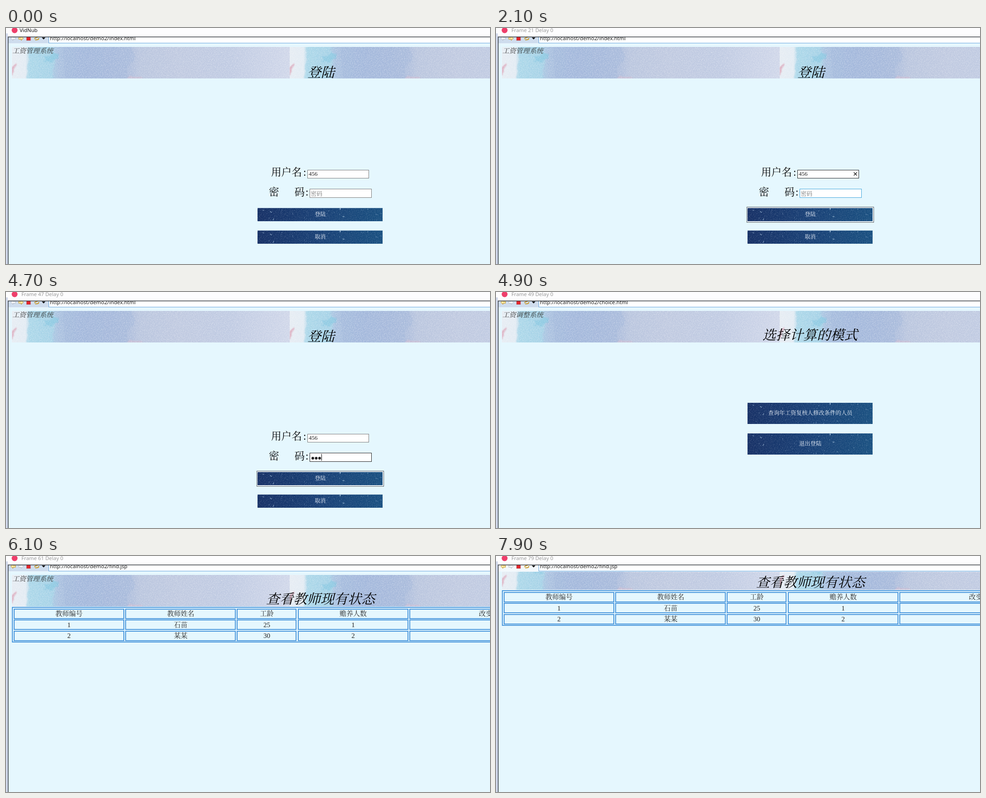
An HTML page that plays this animation: 1068x524 px, repeating every 8 s.

```html
<!DOCTYPE html>
<html lang="zh">
<head>
<meta charset="utf-8">
<style>
  html, body { margin: 0; width: 100%; height: 100%; overflow: hidden; background: #e5f7fe; }
  svg { display: block; }
  text { font-family: "Liberation Serif", "Noto Serif CJK SC", "Noto Sans CJK SC", "Noto Sans CJK", serif; font-size: 15px; fill: #222; white-space: pre; }
  .ui { font-family: "Noto Sans", "Open Sans", sans-serif; }
  .site { font-style: italic; fill: #333; }
  .head { font-style: italic; font-size: 30px; fill: #000; }
  .label { font-size: 22.6px; font-weight: 500; fill: #000; }
  .btn { font-size: 12.4px; fill: #f4f8ff; text-anchor: middle; }
  .field { fill: #fff; stroke: #7a7a7a; }
  .cells { fill: none; stroke: #4a97dc; stroke-width: 2; }
  .cells ~ text { text-anchor: middle; }
</style>
</head>
<body>
<svg width="1068" height="524" viewBox="0 0 1068 524">
  <defs>
    <linearGradient id="wash">
      <stop offset="0" stop-color="#e6ecf3"/><stop offset=".05" stop-color="#e2ebf3"/>
      <stop offset=".065" stop-color="#b4d8ea"/><stop offset=".14" stop-color="#a9cbe4"/>
      <stop offset=".17" stop-color="#a9c0df"/><stop offset=".27" stop-color="#a5b9dc"/>
      <stop offset=".42" stop-color="#adbddc"/><stop offset=".46" stop-color="#b9c5de"/>
      <stop offset=".6" stop-color="#bfc9e0"/><stop offset=".78" stop-color="#bfcae2"/>
      <stop offset="1" stop-color="#cfd6e9"/>
    </linearGradient>
    <linearGradient id="night">
      <stop offset="0" stop-color="#152f65"/><stop offset=".5" stop-color="#173f75"/><stop offset="1" stop-color="#184f80"/>
    </linearGradient>
    <filter id="grain" x="0" y="0" width="1" height="1" color-interpolation-filters="sRGB">
      <feTurbulence type="fractalNoise" baseFrequency=".6" numOctaves="2" seed="3"/>
      <feColorMatrix values="0 0 0 0 1  0 0 0 0 1  0 0 0 0 1  2.2 0 0 0 -.98"/>
    </filter>
    <filter id="rough" x="-.2" y="-.2" width="1.4" height="1.4" color-interpolation-filters="sRGB">
      <feTurbulence type="fractalNoise" baseFrequency=".07" numOctaves="3"/>
      <feDisplacementMap in="SourceGraphic" scale="14" xChannelSelector="R" yChannelSelector="G"/>
      <feGaussianBlur stdDeviation="1"/>
    </filter>
    <symbol id="tile" width="613" height="70">
      <rect width="613" height="70" fill="url(#wash)"/>
      <g filter="url(#rough)">
        <path d="M36 -9H86L98 18L92 46L88 80H34Z" fill="#a5d6e8" opacity=".65"/>
        <path d="M72 22L96 14L106 20L88 34L72 36Z" fill="#7fc5e0" opacity=".6"/>
        <path d="M0 46L8 40L7 56L0 68Z" fill="#dcb3c4"/>
        <path d="M112 -9H258L272 26L250 50L262 80H118Z" fill="#9db5da" opacity=".35"/>
        <path d="M252 68L284 64L296 72L256 76Z" fill="#cdbcd2" opacity=".7"/>
      </g>
      <rect width="613" height="70" filter="url(#grain)" opacity=".5"/>
    </symbol>
    <symbol id="sky">
      <rect width="276" height="47" fill="url(#night)"/>
      <rect width="276" height="47" filter="url(#grain)" opacity=".22"/>
      <g id="stars" stroke="#b9d3ea" stroke-linecap="round"/>
    </symbol>
    <path id="arrow" d="M-5.5 0L-.5 -4.5V-2H5V2H-.5V4.5Z"/>
    <clipPath id="view"><rect x="5" y="35" width="1063" height="489"/></clipPath>
    <clipPath id="bar"><rect x="5" y="20" width="1063" height="15"/></clipPath>
  </defs>

  <rect width="1068" height="524" fill="#e5f7fe"/>
  <g clip-path="url(#view)">
    <g id="page">
      <use href="#tile" x="13" y="42"/>
      <use href="#tile" x="626" y="42"/>
      <text id="site" class="site" x="14" y="56"></text>
      <text id="head" class="head"></text>

      <g id="login">
        <text class="label" x="585" y="328">用户名</text><text class="label" x="656" y="328">:</text>
        <text class="label" x="580" y="372">密</text><text class="label" x="636.5" y="372">码</text><text class="label" x="661" y="372">:</text>
        <rect id="user" class="field" x="665.5" y="315.5" width="135" height="18"/>
        <text x="668" y="328" style="font-size:13px">456</text>
        <path id="clear" d="M789.5 320.5l7 7m0 -7l-7 7" stroke="#222" stroke-width="1.5"/>
        <rect id="pass" class="field" x="670.5" y="357.5" width="136" height="19"/>
        <text id="hint" x="672.5" y="372" style="font-size:12.8px;fill:#767676">密码</text>
        <g id="dots" fill="#222"><circle cx="677" cy="369" r="3"/><circle cx="684.5" cy="369" r="3"/><circle cx="692" cy="369" r="3"/></g>
        <rect id="caret" width="1" height="15" fill="#000"/>
        <rect id="ring" x="553.5" y="397.5" width="280" height="34" fill="#f6fcff" stroke="#555b62"/>
        <use href="#sky" x="555" y="399.5" width="276" height="29.5"/>
        <use href="#sky" x="555" y="449.5" width="276" height="29.5"/>
        <text class="btn" x="693.5" y="417.5" style="font-size:12px">登陆</text>
        <text class="btn" x="693.5" y="467.5" style="font-size:12px">取消</text>
      </g>

      <g id="choice">
        <use href="#sky" x="555" y="246" width="276" height="47"/>
        <use href="#sky" x="555" y="314" width="276" height="47"/>
        <text class="btn" x="693.5" y="273">查询年工资复核人修改条件的人员</text>
        <text class="btn" x="693.5" y="341">退出登陆</text>
      </g>

      <g id="find"><path id="cells" class="cells"/></g>
    </g>
  </g>

  <g clip-path="url(#bar)">
    <rect x="5" y="20" width="1063" height="15" fill="#eef8fd"/>
    <rect id="tools" x="5" y="20" width="89" height="14"/>
    <use id="back" href="#arrow" x="16" y="23"/>
    <use id="next" href="#arrow" transform="translate(33 23) scale(-1 1)"/>
    <rect x="45.5" y="18.5" width="8.5" height="9" fill="#e3242b" stroke="#b9575c"/>
    <path d="M63.5 25q0 -4 4 -3.5l4 -3m-7 8l4 -.5q4 0 4 -4" fill="none" stroke="#c89a2c" stroke-width="2"/>
    <path d="M79 21H87L83 25.5Z" fill="#111"/>
    <rect x="94.5" y="10.5" width="990" height="23" fill="#fff" stroke="#5ea3de"/>
    <text id="url" class="ui" x="97" y="27" style="font-size:11.65px"></text>
  </g>

  <rect width="1068" height="19" fill="#fdfdfe"/>
  <rect y="12" width="4" height="512" fill="#d0d8ea"/>
  <path d="M1068 19.7H4.8V524" fill="none" stroke="#3b4046" stroke-width="1.5"/>
  <circle cx="19" cy="5" r="6.5" fill="#ee3f6b"/>
  <text id="title" class="ui" y="9" style="font-size:11.4px"></text>
</svg>

<script>
const $ = id => document.getElementById(id);
const show = (id, on) => $(id).style.display = on ? '' : 'none';
const set = (id, attrs) => { for (const k in attrs) $(id).setAttribute(k, attrs[k]); };
const add = (parent, tag, attrs, text = '') => {
  const el = document.createElementNS('http://www.w3.org/2000/svg', tag);
  for (const k in attrs) el.setAttribute(k, attrs[k]);
  el.textContent = text;
  $(parent).append(el);
};

let seed = 11;
const rnd = () => (seed = seed * 16807 % 2147483647) / 2147483647;
const star = (x, y, dx, dy, w, o) =>
  add('stars', 'path', { d: `M${x} ${y}l${dx} ${dy}`, 'stroke-width': w, opacity: o });
for (let i = 0; i < 90; i++)
  star(rnd() * 276, rnd() * 47, rnd() * 2 - 1, rnd() * 2, .4 + rnd() * .6, .25 + rnd() * .5);
star(182.5, 1, 0, 2.5, 1.5, 1);
star(28, 8, 3, 2, 1.2, .8);
star(12, 5, 2, 1, 1.2, .7);
star(188, 19, 3, 1, 1.2, .8);
star(36, 24, -2, 3, 1.2, .8);

// table: outer frame, then one box and one label per cell
const cols = [[17, 244, 139], [263, 244, 385.5], [509, 132, 575.5], [644, 244, 766], [890, 366, 1058.5]];
const rows = [
  ['教师编号', '教师姓名', '工龄', '赡养人数', '改变'],
  ['1', '石苗', '25', '1', ''],
  ['2', '某某', '30', '2', '']
];
let boxes = 'M14 114H1260V191H14Z';
rows.forEach((row, r) => row.forEach((label, c) => {
  const [x, w, mid] = cols[c], y = Math.round(116.5 + r * 24.6);
  boxes += `M${x + 1} ${y + 1}h${w - 2}v21h${2 - w}Z`;
  add('find', 'text', { x: mid, y: 133 + r * 24.6 }, label);
}));
set('cells', { d: boxes });

const pages = {
  login: ['index.html', '工资管理系统', '登陆', 665, 108.5],
  choice: ['choice.html', '工资调整系统', '选择计算的模式', 588, 106],
  find: ['find.jsp', '工资管理系统', '查看教师现有状态', 574, 106]
};
const arrowOn = { fill: '#fbe9a6', stroke: '#c08f1e' };
const arrowOff = { fill: '#f3f5f8', stroke: '#b4bac4' };

function draw(t) {
  const name = t < 4800 ? 'login' : t < 5800 ? 'choice' : 'find';
  const [file, site, head, x, y] = pages[name];
  for (const p in pages) show(p, p === name);
  $('url').textContent = 'http://localhost/demo2/' + file;
  $('site').textContent = site;
  $('head').textContent = head;
  set('head', { x, y });
  set('page', { transform: `translate(0 ${t >= 7900 ? -37 : 0})` });

  const first = name === 'login';
  set('back', first ? arrowOff : arrowOn);
  set('next', first ? arrowOn : arrowOff);
  set('tools', { fill: t < 6300 ? '#cfddee' : '#f3f8fc' });

  const step = Math.floor(t / 100);
  $('title').textContent = step ? `Frame ${step} Delay 0` : 'VidNub';
  set('title', { x: step ? 34 : 30 });
  $('title').style.fill = step ? '#999' : '#111';

  const inUser = t >= 1400 && t < 2300, inPass = t >= 2300;
  const typed = [2900, 3200, 3500].filter(k => t >= k);
  $('user').style.stroke = inUser ? '#222' : '';
  $('pass').style.stroke = inPass ? '#222' : t >= 2000 ? '#3fa5dc' : '';
  show('clear', inUser);
  show('ring', t >= 1400);
  show('hint', !typed.length);
  [...$('dots').children].forEach((d, i) => d.style.display = i < typed.length ? '' : 'none');
  const since = t - (typed.at(-1) || (inPass ? 2300 : 1400));
  show('caret', since >= 0 && since % 1060 < 530);
  set('caret', inPass ? { x: 673 + typed.length * 7.67, y: 359.5 } : { x: 688, y: 317 });
}

function loop(now) {
  draw(now % 8000);
  requestAnimationFrame(loop);
}
draw(0);
requestAnimationFrame(loop);
</script>
</body>
</html>
```
